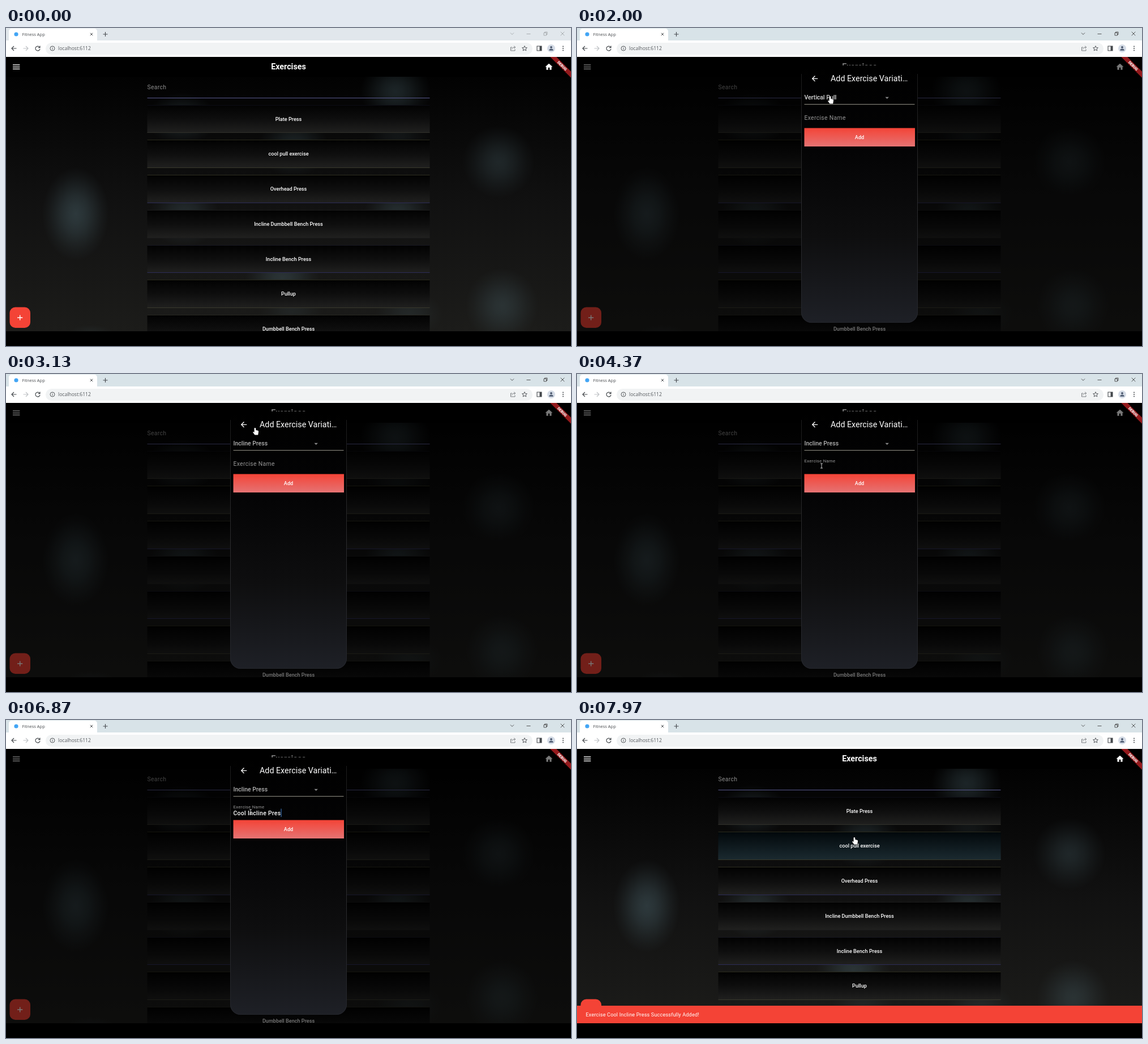
Recreate the animation shown at these times as an HTML page with a canvas. Size 998 by 561 pixels, loop 8000 ms.

```html
<!DOCTYPE html>
<html lang="en">
<head>
<meta charset="utf-8">
<title>Exercises</title>
<style>
  html, body { margin: 0; width: 100%; height: 100%; overflow: hidden; background: #000; }
  canvas { display: block; width: 998px; height: 561px; }
</style>
</head>
<body>
<canvas id="stage" width="998" height="561"></canvas>
<script>
const ctx = document.getElementById('stage').getContext('2d');
const LOOP = 8000, TOP = 51, BOTTOM = 535, RED = '#f44336';
const ROBOTO = 'Roboto, sans-serif', SANS = '"Open Sans", sans-serif';

const ROWS = ['Plate Press', 'cool pull exercise', 'Overhead Press',
  'Incline Dumbbell Bench Press', 'Incline Bench Press', 'Pullup', 'Dumbbell Bench Press'];
const ROW_TOP = ['#0c0c14', '#2a2a1c', '#2e2e20', '#1c1c1c', '#161620', '#2a2a1c', '#262620'];
const ROW_BOTTOM = ['#30302a', '#38382a', '#2c2c58', '#1c1c1c', '#2c2c58', '#38382c', '#333'];
const MENU = ['Incline Press', 'Vertical Pull', 'Horizontal Pull', 'Shoulder Abduction',
  'Shoulder Flexion', 'Shoulder Rotation', 'ShoulderHorizontalAbduction', 'Leg Flexion',
  'Leg Extension', 'Ankle Extension', 'Elbow Flexion', 'Elbow Extension', 'Hip Adduction', 'Hip Adbuction'];
const TYPED = 'Cool Incline Press';

// x, y, rx, ry, strength
const GLOWS = [
  [688, 112, 62, 56, .36], [870, 236, 64, 64, .32], [123, 328, 59, 82, .5], [876, 490, 64, 66, .36],
  [310, 160, 62, 46, .34], [508, 210, 62, 52, .32], [692, 190, 55, 40, .15], [315, 330, 62, 56, .34],
  [692, 325, 60, 46, .36], [488, 440, 66, 48, .4], [505, 500, 55, 40, .16], [712, 505, 60, 40, .2],
  [150, 545, 45, 22, .2]];

// time, x, y of the pointer tip
const PATH = [[350, 250, 300], [850, 26, 510], [1080, 26, 510], [1270, 136, 436], [1750, 440, 130],
  [1950, 447, 121], [2450, 447, 121], [2640, 444, 107], [2850, 440, 95], [3370, 440, 95],
  [3580, 436, 184], [3780, 432, 162], [7020, 432, 162], [7350, 490, 207], [LOOP, 490, 207]];

const clamp = v => Math.max(0, Math.min(1, v));
const ramp = (t, a, b) => clamp((t - a) / (b - a));
const smooth = p => p * p * (3 - 2 * p);
const mix = (a, b, p) => a + (b - a) * p;

function text(s, x, y, size, color, { weight = 400, family = ROBOTO, align = 'left', gap = 0 } = {}) {
  ctx.font = `${weight} ${size}px ${family}`;
  ctx.letterSpacing = gap + 'px';
  ctx.textAlign = align;
  ctx.fillStyle = color;
  ctx.fillText(s, x, y + size * .355);
}

function rect(x, y, w, h, color) {
  ctx.fillStyle = color;
  ctx.fillRect(x, y, w, h);
}

function round(x, y, w, h, r, color) {
  ctx.beginPath();
  ctx.roundRect(x, y, w, h, r);
  ctx.fillStyle = color;
  ctx.fill();
}

function disc(x, y, r, color) {
  ctx.beginPath();
  ctx.arc(x, y, r, 0, 7);
  ctx.fillStyle = color;
  ctx.fill();
}

function fade(y0, y1, ...colors) {
  const g = ctx.createLinearGradient(0, y0, 0, y1);
  colors.forEach((c, i) => g.addColorStop(i / (colors.length - 1), c));
  return g;
}

// Icons on a 24-unit grid, centred on x, y
function icon(d, x, y, color, scale = .65) {
  ctx.save();
  ctx.translate(x - 12 * scale, y - 12 * scale);
  ctx.scale(scale, scale);
  ctx.fillStyle = color;
  ctx.fill(new Path2D(d));
  ctx.restore();
}

function line(d, x, y, color, width = 1) {
  ctx.save();
  ctx.translate(x, y);
  ctx.strokeStyle = color;
  ctx.lineWidth = width;
  ctx.stroke(new Path2D(d));
  ctx.restore();
}

function clipped(x, y, w, h, draw) {
  ctx.save();
  ctx.beginPath();
  ctx.rect(x, y, w, h);
  ctx.clip();
  draw();
  ctx.restore();
}

function browser(active) {
  const dark = '#44484c', frame = active ? '#444' : '#a2a6aa';
  rect(0, 0, 998, 22, active ? '#d8e3e8' : '#e1e7ec');
  rect(0, 22, 998, TOP - 22, '#fff');
  round(5, 1, 156, 24, [5, 5, 0, 0], '#fff');
  disc(18, 11, 3.6, '#42a5f5');
  text('Fitness App', 28.5, 11, 7.5, '#4a4d50', { family: SANS });
  line('M-2.2-2.2L2.2 2.2M2.2-2.2L-2.2 2.2', 151, 11, dark);
  line('M-4 0H4M0-4V4', 175.5, 11, dark, 1.1);
  line('M-3-1.5L0 1.5L3-1.5', 894, 10, frame, .9);
  line('M-3.5 0H3.5', 923, 10.5, frame, .9);
  line('M-3-1.5H1.5V3H-3ZM-1.5-1.5V-3H3V1.5H1.5', 953, 10, frame, .9);
  line('M-3.3-3.3L3.3 3.3M3.3-3.3L-3.3 3.3', 983, 10, frame, .9);

  line('M4.5 0H-4M0-4L-4 0L0 4', 14, 36, dark, 1.2);
  line('M-4.5 0H4M0-4L4 0L0 4', 35, 36, '#bfc2c5', 1.2);
  line('M3.2-2.4A4 4 0 1 0 4 .8M4-4.5V-1.4H.9', 56, 36, dark, 1.2);
  round(70, 26, 860, 21, 10.5, '#f1f3f4');
  line('M4 0A4 4 0 1 1-4 0A4 4 0 1 1 4 0M0-.6V2.2M0-2.3V-1.3', 82, 36, dark, .9);
  text('localhost:6112', 92, 36.2, 8.6, '#55595d', { family: SANS });
  line('M-1.5-2H-4V4H3.5V1.5M-2 1.5C-1.5-1 0-2 4-2M1.8-4.2L4.2-2L1.8.2', 895.5, 36, '#6a6e72', .9);
  line('M0-4.4L1.3-1.4L4.4-1.2L2 .9L2.8 4L0 2.3L-2.8 4L-2 .9L-4.4-1.2L-1.3-1.4Z', 916, 36, dark, .9);
  line('M-4-4H4V4H-4Z', 942, 36, dark, 1.1);
  rect(942.5, 32, 3.5, 8, dark);
  disc(963, 36, 7, '#d5dce6');
  disc(963, 34, 1.9, '#4d5a70');
  round(959.3, 36.7, 7.4, 3, [3, 3, 0, 0], '#4d5a70');
  [-3.6, 0, 3.6].forEach(d => disc(984, 36 + d, 1, dark));
}

function glow([x, y, rx, ry, a]) {
  ctx.save();
  ctx.translate(x, y);
  ctx.scale(rx, ry);
  const g = ctx.createRadialGradient(0, 0, 0, 0, 0, 1);
  [1, .88, .68, .42, .18, 0].forEach((k, i) => g.addColorStop(i / 5, `rgba(72,95,102,${a * k})`));
  rect(-1, -1, 2, 2, g);
  ctx.restore();
}

function page(hover) {
  rect(0, TOP, 998, 561 - TOP, '#000');
  clipped(0, 86, 998, BOTTOM - 86, () => {
    rect(0, 86, 998, 449, fade(86, BOTTOM, '#020202', '#111111', '#1c1c1a'));
    GLOWS.forEach(glow);
    text('Search', 249.5, 104.5, 10.4, '#8c8c8c', { gap: .325 });
    rect(249.5, 123, 499, 1, '#58588e');
    ROWS.forEach((name, i) => {
      const y = 136 + i * 61.75;
      rect(249.5, y, 499, 49, fade(y, y + 49, '#020202', '#0e0e0e', '#20201f'));
      if (i === 1 && hover) {
        ctx.globalAlpha = hover;
        rect(249.5, y, 499, 49, fade(y, y + 49, '#02080b', '#1b2a30'));
        ctx.globalAlpha = 1;
      }
      rect(249.5, Math.round(y - .3), 499, 1, ROW_TOP[i]);
      rect(249.5, Math.round(y + 48.4), 499, 1, ROW_BOTTOM[i]);
      text(name, 499, y + 24.3, 9.15, '#fff', { weight: 500, align: 'center' });
    });
  });
  [-3.6, 0, 3.6].forEach(d => rect(12, 68 + d, 12.4, 1.4, '#fff'));
  text('Exercises', 499, 68.4, 14.3, '#fff', { weight: 700, align: 'center' });
  icon('M10 20v-6h4v6h5v-8h3L12 3 2 12h3v8z', 959, 68.5, '#fff');
  round(6.5, 492.5, 36.5, 36.5, 10, RED);
  line('M-4.6 0H4.6M0-4.6V4.6', 24.7, 511, '#fff', 1.4);
}

function snackbar(t) {
  const h = 31 * smooth(ramp(t, 7620, 7870));
  if (!h) return;
  clipped(0, BOTTOM - h, 998, h, () => {
    rect(0, 500, 998, 35, RED);
    ctx.globalAlpha = ramp(t, 7740, 7890);
    text('Exercise Cool Incline Press Successfully Added!', 15.5, BOTTOM - h + 15.7, 9.1, '#fff', { gap: .16 });
    ctx.globalAlpha = 1;
  });
}

function dialog(t, alpha) {
  ctx.globalAlpha = alpha;
  round(396, 66, 206, 454, [0, 0, 18, 18], fade(66, 520, '#000', '#040405', '#0e0e0f', '#1e2026'));
  line('M.5 15V436A18 18 0 0 0 18.5 453.5H187.5A18 18 0 0 0 205.5 436V15', 396, 66,
    fade(10, 450, '#1c1c1c', '#2c2c2e', '#24262c'));
  icon('M20 11H7.83l5.59-5.59L12 4l-8 8 8 8 1.41-1.41L7.83 13H20v-2z', 420, 89.3, '#fff');
  text('Add Exercise Variati…', 448, 89.3, 14.3, '#fff');
  text(t < 2850 ? 'Vertical Pull' : 'Incline Press', 401.5, 122.7, 10.5, '#b4b4b4', { weight: 500 });
  icon('M7 10l5 5 5-5z', 547.7, 123, '#8a8a8a');
  rect(401.5, 134.2, 195, 1, '#9c9a8e');

  const float = smooth(ramp(t, 3800, 3967));
  text('Exercise Name', 401.5, mix(158, 153.2, float), mix(10.4, 7.8, float), '#969696',
    { gap: mix(.325, .24, float) });
  field(t);

  clipped(401.5, 176.5, 195.5, 32.5, () => {
    rect(401, 176, 196, 33, fade(176, 209, '#f44336', '#e57373'));
    if (t > 7520) disc(495, 206, 15 + 95 * ramp(t, 7520, 7760), `rgba(90,50,50,${.22 * (1 - ramp(t, 7700, 7850))})`);
  });
  text('Add', 499, 192.6, 9.1, '#fff', { weight: 500, align: 'center' });
  ctx.globalAlpha = 1;
}

function field(t) {
  const count = t < 4950 ? 0
    : t < 5850 ? 1 + Math.floor((t - 4950) / 150)
    : Math.min(TYPED.length, 7 + Math.floor((t - 5850) / 102));
  const shown = TYPED.slice(0, count);
  text(shown, 401.5, 164, 10.4, '#fff', { weight: 500, gap: .325 });
  const typing = t > 4950 && t < 7100;
  const caret = typing || (t > 3800 && t < 7500 && (t - 3800) % 1000 < 500);
  if (caret) rect(401.5 + ctx.measureText(shown).width, 156.5, 1.2, 14.5, '#3b6fae');
}

function menu(t) {
  const open = smooth(ramp(t, 2000, 2300)), shut = 1 - ramp(t, 2850, 3100);
  if (!open || !shut) return;
  const top = mix(107, 66, open), end = mix(138, 504, open);
  ctx.globalAlpha = shut * ramp(t, 2000, 2080);
  clipped(390.5, top, 221.5, end - top, () => {
    rect(390, 60, 223, 450, '#000');
    MENU.forEach((name, i) => {
      ctx.globalAlpha = shut * (i === 1 ? 1 : ramp(t, 2050 + i * 15, 2180 + i * 15));
      text(name, 401.5, 91.5 + i * 31.16, 10.5, '#b8b8b8', { weight: 500 });
    });
  });
  ctx.globalAlpha = 1;
}

function banner() {
  clipped(940, TOP, 58, 60, () => {
    ctx.translate(998, TOP);
    ctx.rotate(Math.PI / 4);
    rect(-30, 18.2, 60, 7.8, '#941a1d');
    text('DEBUG', 0, 22.1, 6.5, '#fff', { weight: 900, align: 'center' });
  });
}

function pointer(t) {
  if (t < PATH[0][0]) return;
  const i = PATH.findIndex(k => k[0] > t);
  const [a, b] = [PATH[i - 1], PATH[i]];
  const p = smooth(ramp(t, a[0], b[0]));
  const x = mix(a[1], b[1], p), y = mix(a[2], b[2], p);
  const onFab = t < 1100 && x < 43 && y > 492;
  const inForm = t > 1750 && x > 396;
  if (inForm && t > 3370 && t < 7600 && y > 143 && y < 176) {
    line('M-2-4H2M0-4V4M-2 4H2', x, y, '#ddd', .9);
    return;
  }
  const hand = onFab || inForm;
  const shape = new Path2D(hand
    ? 'M0 0C1.3 0 1.4 1 1.4 4L4.8 4.8C6 5.1 6.2 6 6 7.5L5.2 12.5H-.5L-3.8 8C-4 6.8-2.6 6.6-1.4 8V1C-1.4.3-.8 0 0 0Z'
    : 'M0 0V8.6L1.9 6.9L3.2 9.8L4.5 9.2L3.3 6.3H5.8Z');
  ctx.save();
  ctx.translate(x, y);
  ctx.strokeStyle = '#000';
  ctx.lineWidth = 1;
  ctx.stroke(shape);
  ctx.fillStyle = '#fff';
  ctx.fill(shape);
  ctx.restore();
}

function draw(t) {
  page(ramp(t, 7640, 7860));
  snackbar(t);
  const shown = ramp(t, 1085, 1330) - ramp(t, 7640, 7860);
  const veil = ramp(t, 1085, 1260) - ramp(t, 7660, 7860);
  if (shown > 0 || veil > 0) {
    rect(0, TOP, 998, BOTTOM - TOP, `rgba(0,0,0,${.53 * veil})`);
    dialog(t, shown);
    menu(t);
  }
  banner();
  browser(t > 350);
  pointer(t);
}

const start = performance.now();
function tick() {
  draw((performance.now() - start) % LOOP);
  requestAnimationFrame(tick);
}
tick();
</script>
</body>
</html>
```
